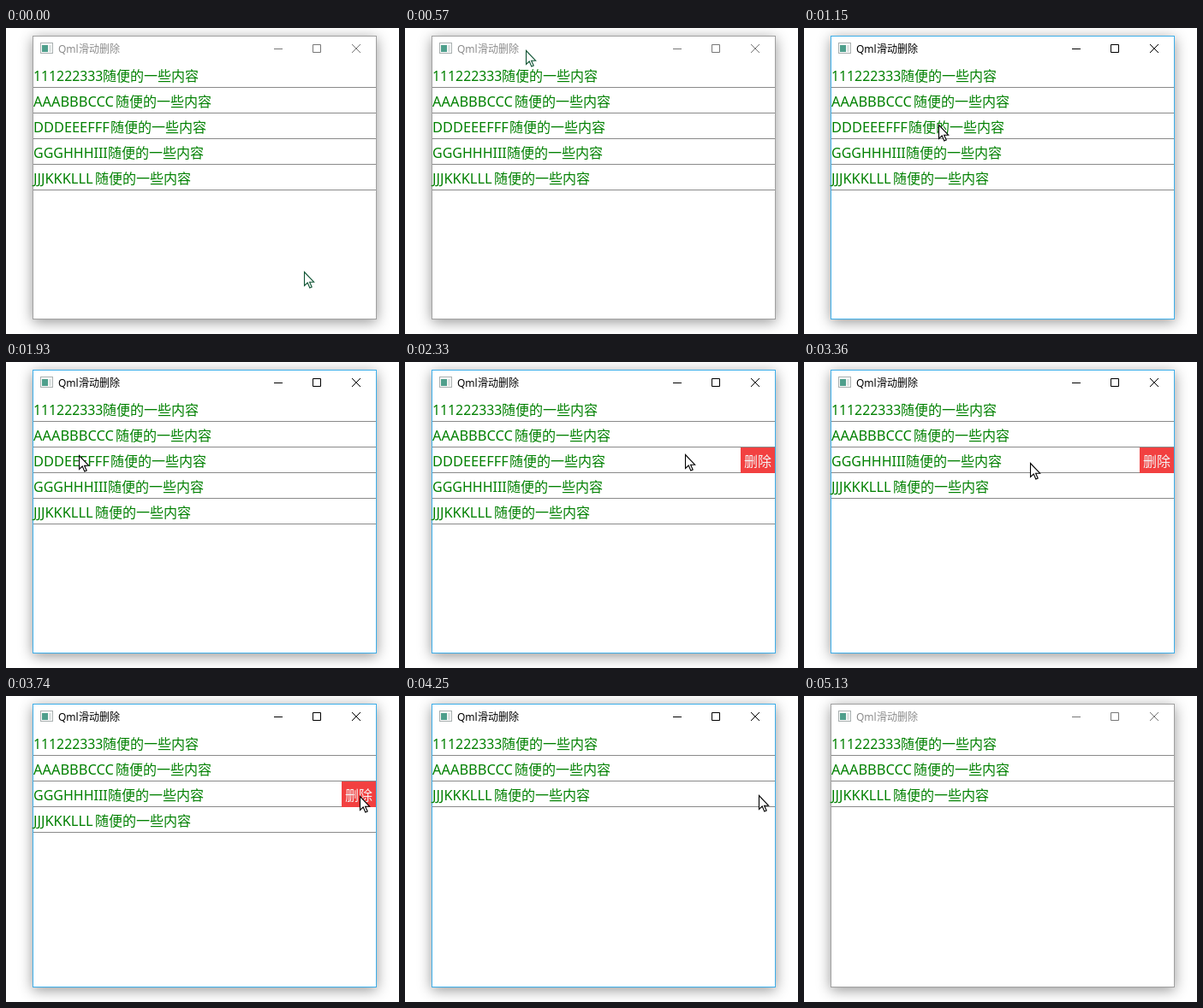
Write an HTML page that moves like this. It is 459 px wide and 358 px high and loops after 5.2 s.

```html
<!DOCTYPE html>
<html lang="zh">
<head>
<meta charset="utf-8">
<title>Qml滑动删除</title>
<style>
  html, body { margin: 0; width: 100%; height: 100%; overflow: hidden; background: #fff; }
  svg { display: block; width: 459px; height: 358px; }
  text { font-family: "Noto Sans", "Noto Sans CJK SC", "Noto Sans CJK", sans-serif; white-space: pre; }
  .frame { fill: #fff; stroke: #3daee9; filter: drop-shadow(0 3px 8px rgba(0, 0, 0, .42)); }
  .title { font-size: 12px; fill: #000; }
  .controls { fill: none; stroke: #000; }
  .inactive .frame { stroke: #a0a0a0; }
  .inactive .title { fill: #8c8c8c; }
  .inactive .controls { stroke: #777; }
  .row text { font-size: 16px; fill: #008000; }
  .row path { stroke: #8a8a8a; }
  .button text { font-size: 16px; fill: #f4f4f4; }
  .cursor { fill: #fff; stroke: #000; stroke-width: 1.1; }
  .inactive .cursor { stroke: #0f5434; }
</style>
</head>
<body>
<svg id="stage" viewBox="0 0 459 358">
  <rect class="frame" x="31.5" y="9.5" width="401" height="331"/>
  <g id="icon">
    <rect x="40.5" y="17.5" width="14" height="12" fill="#fbfbfb" stroke="#a9b0b0"/>
    <rect x="42" y="20" width="7" height="8" fill="#4f9f8c"/>
    <rect x="50" y="20" width="3" height="8" fill="#dde3e2"/>
  </g>
  <text class="title" x="61" y="28.5">Qml<tspan x="85">滑动删除</tspan></text>
  <path class="controls" d="M313 24.5h10M358.5 19.5h9v9h-9zM404 19l10 10M414 19l-10 10"/>
  <g id="rows"></g>
  <g class="button" id="button">
    <rect x="392" y="100" width="40" height="30" fill="#f24040"/>
    <text x="396" y="121.5">删除</text>
  </g>
  <path class="cursor" id="cursor" d="M.5 .5v16l3.7-3.5 2.6 6 2.4-1-2.6-5.8h5z"/>
</svg>
<script>
const LOOP = 5200;
const ROW_HEIGHT = 30;
const stage = document.getElementById('stage');
const rowsGroup = document.getElementById('rows');
const button = document.getElementById('button');
const cursor = document.getElementById('cursor');

// label, font size, x of the Chinese part, time of removal
const rows = [
  ['111222333', 15.8, 113],
  ['AAABBBCCC', 16.4, 128],
  ['DDDEEEFFF', 16.4, 122, 2700],
  ['GGGHHHIII', 16, 119, 3920],
  ['JJJKKKLLL', 16.4, 104],
].map(([label, size, x, removedAt = Infinity]) => {
  rowsGroup.insertAdjacentHTML('beforeend',
    `<g class="row"><text x="32" y="22" style="font-size:${size}px">${label}</text>` +
    `<text x="${x}" y="21.5">随便的一些内容</text><path d="M32 29.5h400"/></g>`);
  return { node: rowsGroup.lastElementChild, removedAt };
});

// time, x, y, whether the move arriving here is eased
const path = [
  [0, 348, 285], [570, 141, 26, true], [840, 141, 26], [1150, 157, 113],
  [1410, 133, 120], [1650, 112, 124], [1930, 85, 109], [2000, 100, 108],
  [2250, 270, 102], [2460, 417, 118], [2520, 413, 117], [2700, 413, 117],
  [3220, 151, 117, true], [3360, 263, 118], [3560, 428, 120], [3740, 413, 117],
  [3920, 413, 117], [4250, 413, 115], [4440, 408, 297], [4770, 428, 362],
];

function cursorAt(t) {
  const next = path.findIndex(key => key[0] > t);
  if (next < 0) return path[path.length - 1].slice(1, 3);
  const [t0, x0, y0] = path[next - 1];
  const [t1, x1, y1, eased] = path[next];
  let p = (t - t0) / (t1 - t0);
  if (eased) p = p * p * (3 - 2 * p);
  return [x0 + (x1 - x0) * p, y0 + (y1 - y0) * p].map(Math.round);
}

const within = (t, from, to) => t >= from && t < to;
const show = (node, visible) => { node.style.display = visible ? '' : 'none'; };

function draw(t) {
  stage.classList.toggle('inactive', !within(t, 640, 5130));
  let top = 40;
  for (const { node, removedAt } of rows) {
    const present = t < removedAt;
    show(node, present);
    node.setAttribute('transform', `translate(0 ${top})`);
    if (present) top += ROW_HEIGHT;
  }
  show(button, within(t, 2000, 2700) || within(t, 3290, 3920));
  cursor.setAttribute('transform', `translate(${cursorAt(t)})`);
}

const start = performance.now();
function tick() {
  draw((performance.now() - start) % LOOP);
  requestAnimationFrame(tick);
}
tick();
</script>
</body>
</html>
```
